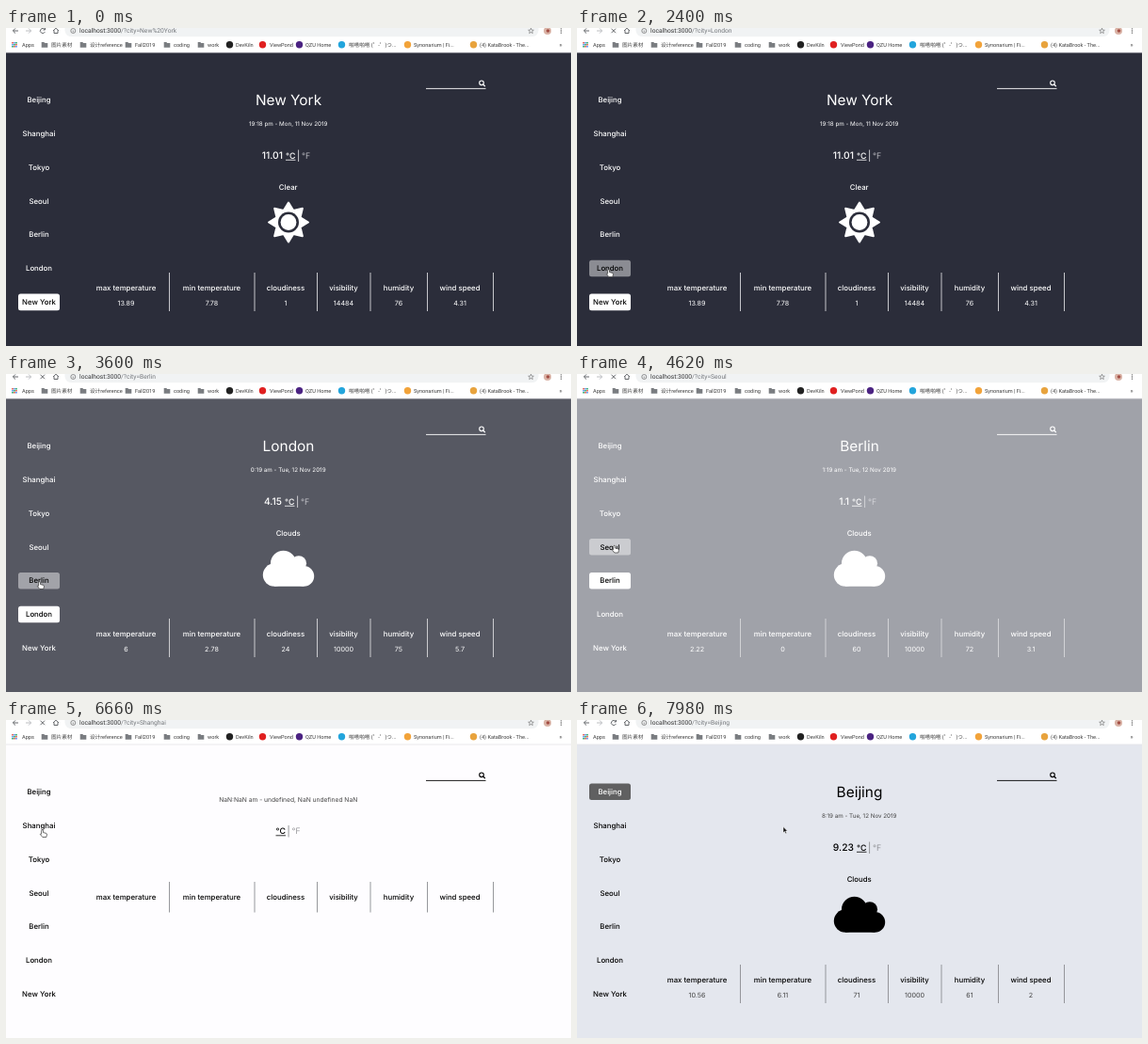
An HTML page that plays this animation: 600 by 338 pixels, repeating every 8 s.

```html
<!DOCTYPE html>
<html lang="en">
<head>
<meta charset="utf-8">
<title>Weather</title>
<style>
  html, body { margin: 0; width: 100%; height: 100%; overflow: hidden; background: #fff; }
  svg { display: block; width: 600px; height: 338px; }
  text { font-family: Inter, "Noto Sans", sans-serif; white-space: pre; text-rendering: geometricPrecision; }
  .chrome text { font-family: Roboto, "Noto Sans CJK SC", "Noto Sans CJK", sans-serif; }
  .mid { text-anchor: middle; }
</style>
</head>
<body>
<svg viewBox="0 0 600 338">
  <g id="page"></g>
  <g id="chrome" class="chrome"></g>
  <g id="cursor"></g>
</svg>
<script>
const LOOP = 8000, STEP = 60;
const cities = ['Beijing', 'Shanghai', 'Tokyo', 'Seoul', 'Berlin', 'London', 'New York'];
const stats = [
  ['max temperature', 127.5, 173.5], ['min temperature', 218.5, 264], ['cloudiness', 297, 330.5],
  ['visibility', 358.5, 387], ['humidity', 417, 447.5], ['wind speed', 482, 517.5]
];
const weather = {
  'New York': { bg: '#2b2d3a', dark: true, date: '19:18 pm - Mon, 11 Nov 2019', temp: '11.01', unitX: 297, sky: 'Clear', values: [13.89, 7.78, 1, 14484, 76, 4.31] },
  London: { bg: '#565862', dark: true, date: '0:19 am - Tue, 12 Nov 2019', temp: '4.15', unitX: 296, sky: 'Clouds', values: [6, 2.78, 24, 10000, 75, 5.7] },
  Berlin: { bg: '#a0a2a9', dark: true, date: '1:19 am - Tue, 12 Nov 2019', temp: '1.1', unitX: 292, sky: 'Clouds', values: [2.22, 0, 60, 10000, 72, 3.1] },
  Seoul: { bg: '#f8f9fd', date: '9:19 am - Tue, 12 Nov 2019', temp: '6.35', unitX: 297, sky: 'Clouds', values: [11, 4, 17, 10000, 87, 1] },
  Tokyo: { bg: '#f8f9fd', date: '9:19 am - Tue, 12 Nov 2019', temp: '14.62', unitX: 297, sky: 'Clouds', values: [16.67, 12.22, 75, 10000, 58, 3.6] },
  Shanghai: { bg: '#e4e7ee', date: '8:19 am - Tue, 12 Nov 2019', temp: '15.37', unitX: 297, sky: 'Clouds', values: [17, 13.89, 20, 10000, 67, 4] },
  Beijing: { bg: '#e4e7ee', date: '8:19 am - Tue, 12 Nov 2019', temp: '9.23', unitX: 297, sky: 'Clouds', values: [10.56, 6.11, 71, 10000, 61, 2] }
};
const blank = { bg: '#fefdff', date: 'NaN:NaN am - undefined, NaN undefined NaN', unitX: 286.5 };

// [city, click, blank page, data, end of loading]
const visits = [
  ['New York', -9, -9, -9, -9],
  ['London', 1680, 2460, 2520, 2580],
  ['Berlin', 3360, 3660, 3720, 3720],
  ['Seoul', 4560, 4680, 4740, 4860],
  ['Tokyo', 5520, 6000, 6060, 6120],
  ['Shanghai', 6480, 6600, 6720, 6780],
  ['Beijing', 7260, 7500, 7560, 7620]
];
// [time, x, y] of the pointer tip
const pointer = [
  [540, 50, 340], [1320, 34, 257], [2820, 34, 257], [3300, 36, 221], [3960, 36, 221], [4380, 40, 182.5],
  [5100, 40, 182.5], [5220, 39.5, 154], [5400, 39, 150], [6120, 39, 150], [6420, 39, 117],
  [6840, 39, 117], [7140, 37, 79], [7680, 37, 79], [7980, 219, 113.5]
];

const $ = id => document.getElementById(id);
const buttonY = i => 76.2 + 35.87 * i;
const text = (s, x, y, size, attrs = '') => `<text x="${x}" y="${y}" font-size="${size}" ${attrs}>${s}</text>`;
const mid = (s, x, y, size, weight = 500, attrs = '') =>
  text(s, x, y + size * .36, size, `class="mid" font-weight="${weight}" ${attrs}`);
const line = (x1, y1, x2, y2, attrs = '') => `<path d="M${x1} ${y1}L${x2} ${y2}" ${attrs}/>`;
const circle = (x, y, r, attrs = '') => `<circle cx="${x}" cy="${y}" r="${r}" ${attrs}/>`;

function sun(ink, bg) {
  const points = Array.from({ length: 16 }, (_, i) => {
    const r = i % 2 ? 13.6 : 21, a = i * Math.PI / 8;
    return `${300 + r * Math.cos(a)},${206.5 + r * Math.sin(a)}`;
  }).join(' ');
  return `<polygon points="${points}" fill="${ink}" stroke="${ink}" stroke-width="2" stroke-linejoin="round"/>` +
    circle(300, 206.5, 11, `fill="${bg}"`) + circle(300, 206.5, 8.4, `fill="${ink}"`);
}

function cloud(ink) {
  return `<g fill="${ink}" transform="translate(272.8 185) scale(.085)">` +
    circle(256, 192, 160) + circle(448, 192, 96) + circle(144, 336, 144) + circle(512, 352, 128) +
    '<path d="M144 190H448L512 300V480H144z"/></g>';
}

function drawPage(city, loaded, hover) {
  const w = loaded ? weather[city] : blank;
  const ink = w.dark ? '#fff' : '#000', soft = w.dark ? '#fff' : '#444', rule = w.dark ? '#d8d8dc' : '#8c8d91';
  const lift = loaded ? 0 : 17.5, drop = loaded ? 260 : 172;
  let out = `<rect y="26" width="600" height="312" fill="${w.bg}"/><g fill="${ink}">`;

  cities.forEach((name, i) => {
    const y = buttonY(i), selected = loaded && name === city;
    let fill = 'none', color = ink;
    if (selected) [fill, color] = w.dark ? ['#fff', '#000'] : ['#606061', '#fff'];
    else if (i === hover && loaded) [fill, color] = [w.dark ? 'rgba(255,255,255,.45)' : 'rgba(0,0,0,.28)', '#000'];
    out += `<rect x="13" y="${y - 8.8}" width="44" height="17.6" rx="2.5" fill="${fill}"/>` +
      mid(name, 35, y, 7.8, 500, `fill="${color}"`);
  });

  out += line(446, 64.4, 509.5, 64.4, `stroke="${ink}" stroke-width=".9"`) +
    circle(505, 58.3, 2.3, `fill="none" stroke="${ink}" stroke-width="1.1"`) +
    line(506.7, 60, 508.8, 62.1, `stroke="${ink}" stroke-width="1.3"`);

  if (loaded) {
    out += mid(city, 300, 76.8, 15.4, 400) + mid(w.sky, 299.7, 169.2, 7.8) +
      (w.sky === 'Clear' ? sun(ink, w.bg) : cloud(ink)) +
      text(w.temp, w.unitX - 3, 139, 10.3, 'text-anchor="end" font-weight="500"');
  }
  out += mid(w.date, 299.7, 101.8 - lift, loaded ? 6.25 : 6.7, 400, `fill="${soft}"`);

  out += `<g transform="translate(${w.unitX} ${-lift})">` +
    text('°C', 0, 138.8, 8.8, 'font-weight="500"') + line(0, 140.3, 10.5, 140.3, `stroke="${ink}" stroke-width=".8"`) +
    line(13.6, 129.5, 13.6, 142, `stroke="${rule}" stroke-width=".9"`) +
    text('°F', 17, 138.8, 8.8, `font-weight="300" fill="${w.dark ? '#e4e4e8' : '#77787c'}"`) + '</g>';

  stats.forEach(([label, x, edge], i) => {
    out += mid(label, x, drop + 16.4, 7.8) +
      line(edge, drop, edge, loaded ? 301 : 204.5, `stroke="${rule}" stroke-width=".9"`);
    if (loaded) out += mid(w.values[i], x, 292.3, 7.2, 400, `fill="${soft}"`);
  });
  return out + '</g>';
}

// [label, icon x, icon colour, text x]; no colour means a folder
const bookmarks = [
  ['图片素材', 41, '', 48], ['设计reference', 82, '', 89], ['Fall2019', 130, '', 137], ['coding', 171, '', 178],
  ['work', 207, '', 214], ['DevKiln', 237.5, '#222', 244], ['ViewPond', 272.5, '#e02020', 280],
  ['QZU Home', 311.5, '#4b2382', 318], ['啪嗒啪嗒 (゜-゜)つ...', 356.5, '#23a5dc', 364],
  ['Synonarium | Fi...', 426.5, '#f2a33a', 433], ['(4) KataBrook - The...', 496.5, '#e8a33d', 503]
];

function drawChrome(city, loading) {
  const thin = 'fill="none" stroke="#55585c" stroke-width=".9"';
  let out = '<rect width="600" height="26" fill="#fff"/>' +
    line(0, 26, 600, 26, 'stroke="#e4e4e7" stroke-width=".8"') +
    '<rect x="62.5" y="-6" width="503" height="15.3" rx="7" fill="#f1f3f4"/>' +
    `<path d="M13 3H7.5M10 .4L7.4 3L10 5.6" ${thin}/>` +
    '<path d="M21 3H26.5M24 .4L26.6 3L24 5.6" fill="none" stroke="#b5b7ba" stroke-width=".9"/>' +
    `<path d="${loading ? 'M36.5 .7L41 5.2M41 .7L36.5 5.2' : 'M41 1.3A2.6 2.6 0 1 0 41.4 4M41.5 0V2H39.5'}" ${thin}/>` +
    `<path d="M50 3L53 .2L56 3M51 2.4V5.5H55V2.4" ${thin}/>` +
    circle(71.3, 3, 2.5, 'fill="none" stroke="#666" stroke-width=".7"') +
    line(71.3, 2.6, 71.3, 4.4, 'stroke="#666" stroke-width=".7"') +
    text(`localhost:3000<tspan fill="#75787c">/?city=${city.replace(' ', '%20')}</tspan>`, 78, 5.4, 6.7, 'fill="#333"');

  const star = Array.from({ length: 10 }, (_, i) => {
    const r = i % 2 ? 1.3 : 3, a = (i / 5 - .5) * Math.PI;
    return `${557.5 + r * Math.cos(a)},${3.2 + r * Math.sin(a)}`;
  }).join(' ');
  out += `<polygon points="${star}" fill="none" stroke="#666" stroke-width=".6"/>` +
    circle(575, 3, 4, 'fill="#d9b3a6"') + circle(575.5, 3, 1.8, 'fill="#a44f45"');
  for (const y of [.8, 3, 5.2]) out += circle(589.5, y, .65, 'fill="#555"');

  const hues = ['#db4437', '#4285f4', '#0f9d58'];
  for (let i = 0; i < 9; i++) {
    const row = i / 3 | 0, col = i % 3;
    out += `<rect x="${6.2 + col * 2}" y="${15 + row * 2}" width="1.5" height="1.5" fill="${hues[(col + row) % 3]}"/>`;
  }
  out += text('Apps', 17, 19.8, 5.6, 'fill="#3c3c3c"');
  for (const [label, iconX, color, x] of bookmarks) {
    out += color ? circle(iconX, 17.8, 3.7, `fill="${color}"`)
      : `<path d="M${iconX - 3.3} 15h2.6l1 1h3v4.8h-6.6z" fill="#7a7d81"/>`;
    out += text(label, x, 19.8, 5.6, 'fill="#3c3c3c"');
  }
  return out + text('»', 587.5, 19.6, 6.5, 'fill="#444"');
}

const hand = '<path transform="translate(-.8 0)" d="M0 0C.9-.5 1.3 0 1.3 .8V2.6L4.6 3.4Q5.4 3.8 5.2 5L4.6 7.5H.6L-1.8 4.6Q-1.9 3.6-.6 4.2V.8Q-.6 .2 0 0z" fill="#fff" stroke="#333" stroke-width=".7"/>';
const arrow = '<path d="M0 0V6.3L1.5 5L2.5 7.3L3.6 6.8L2.6 4.6H4.5z" fill="#111" stroke="#fff" stroke-width=".5"/>';

function pointerAt(t) {
  if (t < pointer[0][0]) return null;
  const next = pointer.findIndex(p => p[0] > t);
  if (next < 0) return pointer.at(-1).slice(1);
  const [t0, x0, y0] = pointer[next - 1], [t1, x1, y1] = pointer[next];
  const k = (t - t0) / (t1 - t0), e = k * k * (3 - 2 * k);
  return [x0 + (x1 - x0) * e, y0 + (y1 - y0) * e];
}

const drawn = {};
function update(id, key, draw) {
  if (drawn[id] === key) return;
  drawn[id] = key;
  $(id).innerHTML = draw();
}

function render(t) {
  const clicked = visits.findLast(v => v[1] <= t);
  const shown = visits.findLast(v => v[2] <= t);
  const city = shown[0], loaded = t >= shown[3], loading = t < clicked[4];
  const tip = pointerAt(t);
  const hover = tip && tip[0] > 13 && tip[0] < 57 ? cities.findIndex((_, i) => Math.abs(tip[1] - buttonY(i)) < 8.8) : -1;

  update('page', [city, loaded, hover].join(), () => drawPage(city, loaded, hover));
  update('chrome', [clicked[0], loading].join(), () => drawChrome(clicked[0], loading));
  update('cursor', !tip ? '' : hover < 0 ? 'arrow' : 'hand', () => !tip ? '' : hover < 0 ? arrow : hand);
  if (tip) $('cursor').setAttribute('transform', `translate(${tip[0]} ${tip[1]})`);
}

const start = performance.now();
function tick() {
  const t = (performance.now() - start) % LOOP;
  render(Math.floor(t / STEP) * STEP);
  requestAnimationFrame(tick);
}
tick();
</script>
</body>
</html>
```
